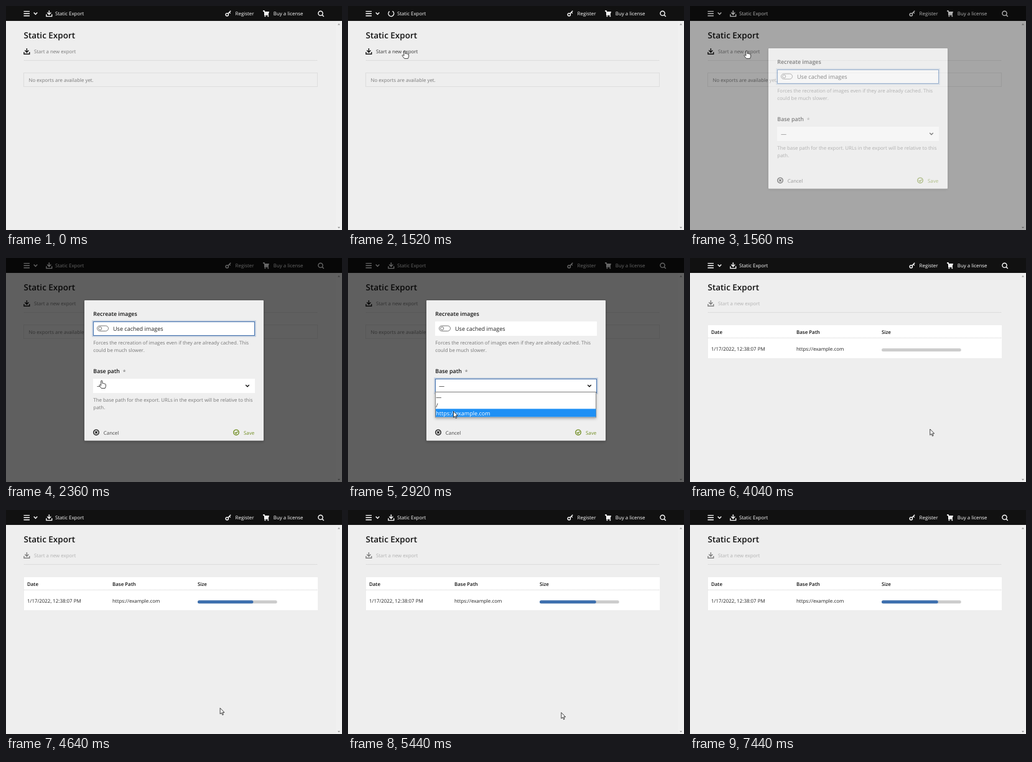
Animation of 540x360 px, one loop 8000 ms. Source, as an HTML page:

```html
<!DOCTYPE html>
<html lang="en">
<head>
<meta charset="utf-8">
<title>Static Export</title>
<style>
html, body { margin: 0; width: 100%; height: 100%; overflow: hidden; background: #eee; }
svg { display: block; width: 540px; height: 360px; }
text { font: 7.9px "Open Sans", "Noto Sans", sans-serif; fill: #222; text-rendering: geometricPrecision; white-space: pre; }
.bold { font-weight: 600; fill: #111; }
.help { fill: #777; }
.label { font-size: 8.9px; }
.field { font-size: 9.05px; }
.title { font-size: 13.5px; }
.bar text { fill: #fff; }
.line { fill: none; stroke: currentColor; stroke-width: 1.4; }
.dots { fill: none; stroke: #ccc; stroke-width: 1; stroke-dasharray: 1 1; }
.focus { fill: #fff; stroke: #4271ae; }
</style>
</head>
<body>
<svg viewBox="0 0 540 360">
  <defs>
    <path id="download" class="line" d="M0-5V1.2M-3-1.7 0 1.4 3-1.7M-4.4 1V4.3H4.4V1"/>
    <path id="chevron" class="line" d="M-2.8-1.4 0 1.4 2.8-1.4"/>
    <filter id="shadow" x="-10%" y="-20%" width="120%" height="150%">
      <feDropShadow dx="0" dy="1.5" stdDeviation="2" flood-opacity=".3"/>
    </filter>
  </defs>
  <rect width="540" height="360" fill="#eee"/>
  <rect x="530" y="24" width="10" height="336" fill="#f0f0f0"/>
  <path d="M533 30.5 535 28 537 30.5ZM533 355 535 357.5 537 355Z" fill="#999"/>

  <g class="bar" color="#fff">
    <rect width="540" height="24" fill="#111"/>
    <path class="line" d="M28.5 8.6H38M28.5 12.2H38M28.5 15.8H38"/>
    <use href="#chevron" x="47.5" y="12"/>
    <use id="barIcon" href="#download" x="69.3" y="12.3"/>
    <circle id="spinner" class="line" cx="69.3" cy="12.2" r="4.4" stroke-dasharray="22 5.65"/>
    <text x="79" y="15.3">Static Export</text>
    <circle cx="355.3" cy="13.8" r="2.2" class="line" stroke-width="1.8"/>
    <path class="line" d="M356.8 12.2 361.2 7.8M358.7 10.2 360.8 11.8"/>
    <text x="368.6" y="15.3">Register</text>
    <path d="M413 7.5H415.2L415.8 9H423L421.6 13.2H416.2V14.2H422V15H415V9.6L414.4 8.4H413Z" fill="#fff"/>
    <path class="line" d="M413 8H415.2L416 14H422"/>
    <circle cx="416.4" cy="16.3" r="1.1" fill="#fff"/>
    <circle cx="421.3" cy="16.3" r="1.1" fill="#fff"/>
    <text x="429.8" y="15.3">Buy a license</text>
    <circle cx="505.5" cy="11.8" r="3.6" class="line"/>
    <path class="line" d="M508 14.3 510.8 17.1"/>
  </g>

  <text class="bold title" x="28.5" y="52">Static Export</text>
  <g id="start" color="#111">
    <use href="#download" x="33.4" y="73"/>
    <text id="startText" x="45" y="76">Start a new export</text>
  </g>
  <path class="dots" d="M29 87.5H501"/>

  <g id="empty">
    <rect class="dots" x="28.5" y="107.5" width="472" height="22"/>
    <text class="help" x="36.5" y="122.2">No exports are available yet.</text>
  </g>

  <g id="table">
    <rect x="29" y="108" width="472" height="53" fill="#fff"/>
    <path class="dots" d="M29 128.5H501"/>
    <text class="bold" x="34" y="122">Date</text>
    <text class="bold" x="171" y="122">Base Path</text>
    <text class="bold" x="308" y="122">Size</text>
    <text x="34" y="148.8">1/17/2022, 12:38:07 PM</text>
    <text x="171" y="148.8">https://example.com</text>
    <rect x="308" y="145.2" width="127.7" height="5" rx="2.5" fill="#ccc"/>
    <rect id="progress" x="308" y="145.2" height="5" rx="2.5" fill="#3d6fae"/>
  </g>

  <g id="modal">
    <rect width="540" height="360" opacity=".6"/>
    <rect x="126" y="68" width="288" height="225.5" rx="1" fill="#efefef" filter="url(#shadow)"/>
    <text class="bold label" x="140.3" y="92.6">Recreate images</text>
    <rect x="140" y="102" width="260" height="23" fill="#fff"/>
    <g id="toggleFocus">
      <rect x="139.5" y="101.5" width="261" height="24" fill="none" stroke="#4271ae" stroke-opacity=".25" stroke-width="2.5"/>
      <rect class="focus" x="140.5" y="102.5" width="259" height="22"/>
    </g>
    <rect x="146.5" y="109" width="18" height="8.4" rx="4.2" fill="#fff" stroke="#777"/>
    <circle cx="151.2" cy="113.2" r="2.5" fill="#fff" stroke="#777"/>
    <text class="field" x="172" y="116.6">Use cached images</text>
    <text class="help" x="140.3" y="138.7">Forces the recreation of images even if they are already cached. This</text>
    <text class="help" x="140.3" y="150.7">could be much slower.</text>

    <text class="bold label" x="140.3" y="184.8">Base path</text>
    <text class="help label" x="187.8" y="185.5">*</text>
    <rect x="140" y="194" width="260" height="23" fill="#fff"/>
    <g id="selectFocus">
      <rect x="139.5" y="193.5" width="261" height="24" fill="none" stroke="#4271ae" stroke-opacity=".25" stroke-width="2.5"/>
      <rect class="focus" x="140.5" y="194.5" width="259" height="22"/>
    </g>
    <text id="value" class="field" x="146" y="208.8"></text>
    <use href="#chevron" x="388" y="205.3" color="#111"/>
    <text class="help" x="140.3" y="231">The base path for the export. URLs in the export will be relative to this</text>
    <text class="help" x="140.3" y="243">path.</text>
    <g color="#111">
      <circle class="line" cx="145" cy="280.3" r="4.2"/>
      <path class="line" d="M143.3 278.6 146.7 282M146.7 278.6 143.3 282"/>
    </g>
    <text x="156.8" y="283.7" style="fill:#444">Cancel</text>
    <g color="#6f8c1f">
      <circle class="line" cx="370" cy="280.3" r="4.2"/>
      <path class="line" d="M367.9 280.2 369.6 281.9 372.3 278.9"/>
    </g>
    <text x="382" y="283.7" style="fill:#6f8c1f">Save</text>

    <g id="menu">
      <rect x="140.5" y="215.5" width="258" height="40.5" fill="#fff" stroke="#888" filter="url(#shadow)"/>
      <rect id="highlight" x="141" width="257.5" height="13" fill="#1e90f5"/>
      <g id="options"></g>
    </g>
  </g>

  <g id="cursor" fill="#fff" stroke="#111" stroke-width=".8" stroke-linejoin="round">
    <path id="arrow" d="M0 0V9.6L2.2 7.6 3.8 11.2 5.3 10.5 3.8 7.1H6.8Z"/>
    <path id="hand" d="M-1.1 1C-1.1-.4 1.1-.4 1.1 1V4.5C2 3.9 3 4.2 3.2 5 4 4.5 5 4.8 5.1 5.5 6 5.2 6.6 5.7 6.6 6.8V9.5L5.4 12.4H-.4L-3.6 8.4C-4.4 7.2-3 6.2-2 7.2L-1.1 8Z"/>
  </g>
</svg>
<script>
const LOOP = 8000, STEP = 40;
const el = id => document.getElementById(id);
const show = (id, on) => el(id).style.display = on ? '' : 'none';
const within = (t, from, to) => t >= from && t < to;
const clamp = v => Math.min(1, Math.max(0, v));
const ease = v => v * v * (3 - 2 * v);

const choices = ['—', '/', 'https://example.com'];
const options = choices.map((label, i) => {
  const text = document.createElementNS('http://www.w3.org/2000/svg', 'text');
  text.setAttribute('class', 'field');
  text.setAttribute('x', 141.3);
  text.setAttribute('y', 226.8 + i * 13);
  text.textContent = label;
  el('options').append(text);
  return text;
});

// Pointer stops: time, x, y
const stops = [
  [760, 372, 362], [1360, 91, 72], [1920, 91, 72], [2400, 155, 199.5],
  [2680, 156, 210], [2920, 169.5, 246.5], [3200, 169.5, 246.5], [3880, 386, 275],
  [4120, 385.7, 275], [4720, 342, 320.5], [5440, 342.8, 325.5],
  [7200, 342.8, 325.5], [7440, 140, 366]
];

function pointerAt(t) {
  const next = stops.findIndex(s => s[0] > t);
  if (next < 1) return stops[next ? stops.length - 1 : 0].slice(1);
  const [t0, x0, y0] = stops[next - 1], [t1, x1, y1] = stops[next];
  const k = ease((t - t0) / (t1 - t0));
  return [x0 + (x1 - x0) * k, y0 + (y1 - y0) * k];
}

function draw(t) {
  const exported = t >= 4000;
  const loading = within(t, 1440, 1560) || within(t, 3960, 4040);
  const hovering = within(t, 1280, 1560);
  const [x, y] = pointerAt(t);

  show('barIcon', !loading);
  show('spinner', loading);
  el('spinner').setAttribute('transform', `rotate(${-60 + (t - 1520) * .36} 69.3 12.2)`);

  el('start').style.opacity = exported ? .5 : 1;
  el('startText').style.fill = hovering ? '#333' : '#777';
  show('empty', !exported);
  show('table', exported);
  el('progress').setAttribute('width', 90.7 * ease(clamp((t - 4120) / 560)));

  show('modal', within(t, 1560, 4000));
  el('modal').style.opacity = t < 1600 ? .5 : 1;
  show('toggleFocus', t < 2520);
  show('selectFocus', t >= 2520);
  show('menu', within(t, 2600, 3240));
  el('value').textContent = choices[t < 3240 ? 0 : 2];
  const active = t < 2800 ? 0 : t < 2880 ? 1 : 2;
  el('highlight').setAttribute('y', 216.4 + active * 13);
  options.forEach((o, i) => o.style.fill = i === active ? '#fff' : '#222');

  const hand = within(t, 1280, 1960) || within(t, 2320, 2600) || within(t, 3760, 4000);
  show('cursor', within(t, 800, 7440));
  show('hand', hand);
  show('arrow', !hand);
  el('cursor').setAttribute('transform', `translate(${x} ${y})`);
}

const began = performance.now();
function tick() {
  const t = (performance.now() - began) % LOOP;
  draw(Math.floor(t / STEP) * STEP);
  requestAnimationFrame(tick);
}
tick();
</script>
</body>
</html>
```
